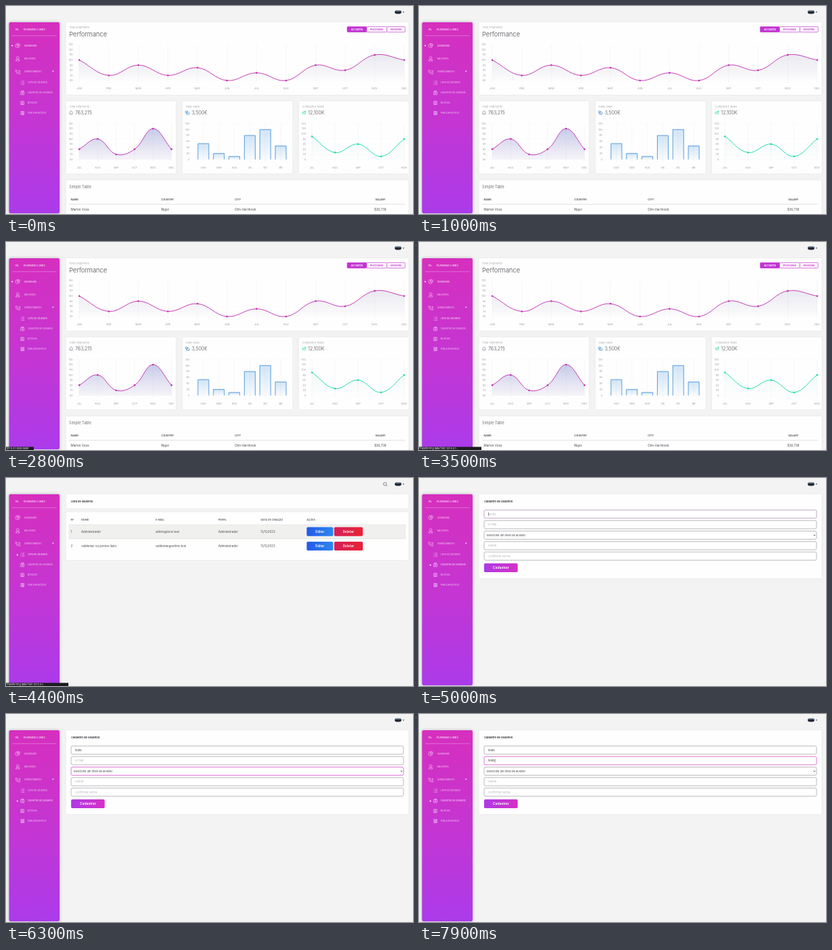
Animation, 600 px wide and 307 px high, one loop 8 s. Source, as an HTML page:

```html
<!DOCTYPE html>
<html lang="pt">
<head>
<meta charset="utf-8">
<style>
html, body { margin: 0; width: 100%; height: 100%; overflow: hidden; background: #f3f3f4 }
svg { display: block; width: 100vw; height: 100vh; font-family: Inter, "Open Sans", sans-serif }
.icon { fill: none; stroke: #fff; stroke-width: .55; opacity: .85 }
.card { fill: #fefefe; filter: drop-shadow(0 .5px 1px #0001) }
</style>
</head>
<body>
<svg id="stage" viewBox="0 0 600 307"></svg>
<script>
const LOOP = 8000, LIST_AT = 3600, FORM_AT = 4500;
const PINK = '#c332b4', INK = '#4a4a52', GREY = '#9a9aa2';
const MONTHS = ['JAN', 'FEB', 'MAR', 'APR', 'MAY', 'JUN', 'JUL', 'AUG', 'SEP', 'OCT', 'NOV', 'DEC'];

const rect = (x, y, x2, y2, attrs) =>
  `<rect x="${x}" y="${y}" width="${x2 - x}" height="${y2 - y}" ${attrs}/>`;
const text = (x, y, s, size = 4, fill = INK, attrs = '') =>
  `<text x="${x}" y="${y}" font-size="${size}" fill="${fill}" ${attrs}>${s}</text>`;
const mid = (x, y, s, size, fill, attrs = '') => text(x, y, s, size, fill, 'text-anchor="middle" ' + attrs);
const path = (d, attrs) => `<path d="${d}" ${attrs}/>`;
const group = (id, body, attrs = '') => `<g id="${id}" ${attrs}>${body}</g>`;
const card = (x, y, x2, y2) => rect(x, y, x2, y2, 'rx="1" class="card"');
const BOLD = 'font-weight="600"', LIGHT = 'font-weight="300"';

function gradient(id, stops, horizontal) {
  const list = stops.map(([color, alpha = 1], i) =>
    `<stop offset="${i / (stops.length - 1)}" stop-color="${color}" stop-opacity="${alpha}"/>`).join('');
  return `<linearGradient id="${id}" x2="${horizontal ? 1 : 0}" y2="${horizontal ? 0 : 1}">${list}</linearGradient>`;
}

// Smooth line through points, each handle parallel to the chord of its neighbours.
function spline(pts, tension = .4) {
  const handles = pts.map(([x, y], i) => {
    const a = pts[i - 1] || pts[i], b = pts[i + 1] || pts[i];
    const da = Math.hypot(x - a[0], y - a[1]), db = Math.hypot(b[0] - x, b[1] - y);
    const ka = tension * da / (da + db), kb = tension * db / (da + db);
    const dx = b[0] - a[0], dy = b[1] - a[1];
    return { before: [x - ka * dx, y - ka * dy], after: [x + kb * dx, y + kb * dy] };
  });
  return 'M' + pts[0] + pts.slice(1).map((p, i) =>
    `C${handles[i].after} ${handles[i + 1].before} ${p}`).join('');
}

// Value labels and faint grid; returns the value-to-height function too.
function axes({ x, y, low, high, step, labels, xs, right }) {
  const [top, bottom] = y, at = v => bottom - (v - low) / (high - low) * (bottom - top);
  let out = '';
  for (let v = low; v <= high; v += step) {
    out += text(x, at(v) + 1.3, v, 3.7, GREY, 'text-anchor="end"');
    out += path(`M${x + 3} ${at(v)}H${right}`, 'stroke="#0000000a" stroke-width=".4"');
  }
  labels.forEach((s, i) => {
    out += path(`M${xs[i]} ${top}V${bottom + 3}`, 'stroke="#00000010" stroke-width=".5"');
    out += mid(xs[i], bottom + 13, s, 3.8, GREY);
  });
  return { at, out };
}

function lineChart(spec, values, color, fill) {
  const xs = values.map((_, i) => spec.first + spec.gap * i), right = xs[xs.length - 1];
  const { at, out } = axes({ ...spec, xs, right });
  const pts = values.map((v, i) => [xs[i], at(v)]), curve = spline(pts);
  return out + path(`${curve}V${spec.y[1]}H${xs[0]}Z`, `fill="url(#${fill})"`) +
    path(curve, `fill="none" stroke="${color}" stroke-width=".95"`) +
    pts.map(([x, y]) => `<circle cx="${x}" cy="${y}" r="1.3" fill="${color}"/>`).join('');
}

function barChart(spec, values) {
  const xs = values.map((_, i) => spec.first + spec.gap * i);
  const { at, out } = axes({ ...spec, xs, right: 417 });
  return out + values.map((v, i) =>
    path(`M${xs[i] - 8} ${at(0)}V${at(v)}h16V${at(0)}`, 'fill="url(#blueFade)" stroke="#4a94d6" stroke-width=".9"')).join('');
}

function sidebar() {
  const item = (x, y, s, id) => text(x, y + 1, s, 2.95, '#fff', `id="${id}" opacity=".8"`);
  const icons = [
    'M16.6 55.6a3 3 0 1 0 3.2 3.6h-3.2zM17.8 55.2v2.8h2.8a2.9 2.9 0 0 0-2.8-2.8',
    'M17.2 74.6a1.7 1.9 0 1 0 .1 0M14.4 81q0-2.6 2.8-2.6t2.8 2.6z',
    'M14 95q.8-1.6 2 0t0 2q1.4 1.6 2.6 1t2 1-1.3 1.3q-5-.5-5.3-5.3M18 95.5h2.5v2',
    'M21.5 111h1m1 0h3.7M21.5 113.3h1m1 0h3.7M21.5 115.6h1m1 0h3.7',
    'M21.7 126.5h5v4.3h-5zM23 126.5v-1.2h2.5v1.2M24.2 127.4v2.6M23 128.7h2.5',
    'M21.8 140.7h4.6v4.8h-4.6zM22.8 142h2.5M22.8 143.2h2.5M22.8 144.4h2.5',
    'M22 155.5h4.6v5H22zM23 157h2.5v1.4H23zM23 159.4h2.5'
  ];
  return rect(4.5, 24, 79, 306, 'rx="2" fill="url(#side)" style="filter:drop-shadow(0 0 2px #0004)"') +
    text(14, 35.6, 'RL', 4.1, '#fff') + text(26, 35.6, 'RUNNING LINES', 4.1, '#fff') +
    path('M9 43.8H74.5', 'stroke="#fff" stroke-opacity=".5" stroke-width=".6"') +
    icons.map(d => path(d, 'class="icon"')).join('') +
    item(27, 58.5, 'DASHBOARD', 'navHome') + item(27, 77.7, 'MEU PERFIL', 'navMe') +
    item(27, 96.7, 'GERENCIAMENTO', 'navAdmin') + path('M67.8 95.7h3l-1.5 1.6z', 'fill="#fff"') +
    item(32, 113, 'LISTA DE USUÁRIOS', 'navList') + item(32, 128, 'CADASTRO DE USUÁRIOS', 'navForm') +
    item(32, 142.8, 'NOTÍCIAS', 'navNews') + item(32, 157.7, 'PUBLICAR NOTÍCIA', 'navPost') +
    '<circle id="dot" r="1" fill="#fff"/>';
}

function header() {
  return rect(573, 6.3, 583, 11.5, 'rx="2.4" fill="url(#photo)"') +
    path('M584.7 8.6h2.6l-1.3 1.5z', 'fill="#333"') +
    path('M561 8.9a2.3 2.3 0 1 1-4.6 0a2.3 2.3 0 1 1 4.6 0M560.4 10.6l1.7 1.7',
      'id="search" fill="none" stroke="#444" stroke-width=".6"');
}

function dashboard() {
  const button = (x, x2, s, on) =>
    rect(x, 30.6, x2, 38.4, `fill="${on ? '#c233d3' : '#fefefe'}" stroke="#c93bd0" stroke-width=".7" rx=".8"`) +
    mid((x + x2) / 2, 35.9, s, 3.8, on ? '#fff' : '#c233c8', BOLD);
  const small = (x, title, value) => card(x, 140.5, x + 162, 247.3) +
    text(x + 4.7, 149.5, title, 4, GREY, LIGHT) + text(x + 13.5, 160.3, value, 6.9, INK, LIGHT);
  const y = [173.5, 226.5];
  return card(88.5, 24, 593.5, 131) +
    text(93, 33.2, 'Total Shipments', 4, GREY, LIGHT) + text(93, 45, 'Performance', 9.3, INK, LIGHT) +
    button(531.5, 561.5, 'Purchases') + button(561.5, 588.3, 'Sessions') + button(503, 531.5, 'Accounts', true) +
    lineChart({ x: 98.5, y: [57, 110], low: 60, high: 130, step: 10, labels: MONTHS, first: 108, gap: 43.55 },
      [100, 70, 90, 70, 85, 60, 75, 60, 90, 80, 110, 100], PINK, 'greyFade') +
    small(88.5, 'Total Shipments', '763,215') +
    path('M93.3 159.2q1-.8 1-2.6a1.7 1.7 0 0 1 3.4 0q0 1.8 1 2.6zM95.3 160.4h1.4', 'fill="none" stroke="#777087" stroke-width=".6"') +
    lineChart({ x: 98.5, y, low: 60, high: 130, step: 10, labels: MONTHS.slice(6), first: 108, gap: 27.2 },
      [80, 100, 70, 80, 120, 80], PINK, 'violetFade') +
    small(260.3, 'Daily Sales', '3,500€') +
    path('M264.7 155h2.5v2.5h-2.5zM267.2 156.4h2l1 1.5v1.6h-4.3zM265.8 159.8h.8M268.5 160h.8', 'fill="none" stroke="#4187d0" stroke-width=".7"') +
    barChart({ x: 270.5, y, low: 0, high: 120, step: 20, labels: ['USA', 'GER', 'AUS', 'UK', 'RO', 'BR'], first: 291, gap: 22.8 },
      [53, 20, 10, 80, 100, 45]) +
    small(431.8, 'Completed Tasks', '12,100K') +
    path('M436.3 157l5.7-2.2-1.2 5-2-1.5-1.2 1.4v-2zM438.8 158.2l3.2-3.4', 'fill="none" stroke="#20d8a4" stroke-width=".6"') +
    lineChart({ x: 442, y, low: 0, high: 140, step: 20, labels: MONTHS.slice(6, 11), first: 451, gap: 34 },
      [90, 27, 60, 12, 80], '#1fdca8', 'greenFade') +
    card(88.5, 257.3, 593.5, 320) + text(93, 268.8, 'Simple Table', 5.5, INK, LIGHT) +
    [['NAME', 95.5], ['COUNTRY', 228.7], ['CITY', 337.3]].map(([s, x]) => text(x, 287, s, 3.75, INK, BOLD)).join('') +
    text(559.5, 287, 'SALARY', 3.75, INK, BOLD + ' text-anchor="end"') +
    path('M93 292.6H588.5', 'stroke="#cfcfd4" stroke-width=".6"') +
    [['Marlen Voss', 95.5], ['Niger', 228.7], ['Olm-Varnhoek', 337.3]].map(([s, x]) => text(x, 301.7, s, 4.6)).join('') +
    text(560.5, 301.7, '$36,738', 4.5, INK, 'text-anchor="end"');
}

function userList() {
  const cols = [95.5, 111, 220.5, 313, 375.5];
  const button = (x, x2, y, s, fill) => rect(x, y, x2, y + 13.2, `rx="1.8" fill="url(#${fill})"`) +
    mid((x + x2) / 2, y + 8.3, s, 4.7, '#fff', BOLD);
  const row = (y, cells) => cells.map((s, i) => text(cols[i], y + 1.6, s, 4.4)).join('') +
    button(443.3, 482.3, y - 6.7, 'Editar', 'blue') + button(483.8, 526, y - 6.7, 'Deletar', 'red');
  return card(88.5, 24, 593.5, 45) + text(96, 36.2, 'Lista de usuários', 3.9, '#25252d', BOLD) +
    card(88.5, 50.3, 593.5, 121) +
    ['Nº', 'NOME', 'E-MAIL', 'PERFIL', 'DATA DE CRIAÇÃO', 'AÇÕES']
      .map((s, i) => text([...cols, 443.3][i], 63.2, s, 3.7, INK, 'font-weight="500"')).join('') +
    rect(93, 69, 588.5, 89.8, 'fill="#f0f0ee" stroke="#d6d6d8" stroke-width=".5"') +
    row(79.2, [1, 'Administrador', 'admin@lorvi.test', 'Administrador', '11/11/2023']) +
    row(100.6, [2, 'valdemar rui pontes lázio', 'valdemar@velmo.test', 'Administrador', '11/11/2023']);
}

function userForm() {
  const field = (y, id, s, x = 102, color = '#b3b1b8') =>
    rect(96, y, 586, y + 12.1, `id="${id}Box" rx="2" fill="#fff" stroke-width=".8"`) +
    text(x, y + 7.6, s, 4.1, color, `id="${id}"`);
  return card(88.5, 24, 593.5, 148) + text(96, 36.3, 'Cadastro de usuários', 4.1, '#25252d', BOLD) +
    field(47.2, 'name', 'Nome') + field(62.8, 'mail', 'E-mail') +
    field(78.3, 'level', 'Selecione um nível de acesso', 99.5, '#3c3c44') +
    field(93.8, 'pass', 'Senha') + field(109.2, 'again', 'Confirmar senha') +
    path('M581.7 83.8l1.3 1.3 1.3-1.3', 'fill="none" stroke="#222" stroke-width=".8"') +
    rect(96, 126, 145.5, 139, 'rx="1.8" fill="url(#pinkButton)"') +
    mid(120.8, 134.3, 'Cadastrar', 5, '#fff', BOLD) +
    group('hint', rect(96, 59.4, 586, 69, 'rx="1" fill="#2c3540"') + text(98, 65.8, 'teste', 4.1, '#fff')) +
    rect(0, 0, .5, 5, 'id="caret" fill="#222"');
}

const stage = document.getElementById('stage');
stage.innerHTML = '<defs>' +
  gradient('side', [['#d62fbe'], ['#c535d2'], ['#ab3bea']]) +
  gradient('photo', [['#8a97ab'], ['#20283a'], ['#171a24']]) +
  gradient('greyFade', [['#7878a8', .16], ['#7878a8', .01]]) +
  gradient('violetFade', [['#6a78c8', .38], ['#8a80c0', .08]]) +
  gradient('blueFade', [['#4a9be0', .25], ['#4a9be0', .03]]) +
  gradient('greenFade', [['#42b89a', .07], ['#42b89a', 0]]) +
  gradient('blue', [['#2458e8'], ['#2e88ee']], true) +
  gradient('red', [['#d5205a'], ['#e82335']], true) +
  gradient('pinkButton', [['#ad3ae6'], ['#d630c6']], true) + '</defs>' +
  rect(0, 0, 600, 307, 'fill="#f3f3f4"') + header() + sidebar() +
  group('home', dashboard()) + group('list', userList()) + group('form', userForm()) +
  group('status', rect(0, 302.4, 92, 307, 'id="statusBox" fill="#1b1b22"') +
    text(.3, 306.4, '', 3.7, '#fff', 'id="statusText"'));

const el = id => document.getElementById(id);
const show = (id, on) => el(id).style.display = on ? '' : 'none';
const typed = (t, start) => 'teste'.slice(0, Math.max(0, Math.floor((t - start) / 100)));

function fill(id, value, placeholder) {
  el(id).textContent = value || placeholder;
  el(id).setAttribute('fill', value ? '#333' : '#b3b1b8');
}

function drawForm(t) {
  const focus = t < 4900 ? '' : t < 6200 ? 'name' : t < 6800 ? 'level' : 'mail';
  fill('name', typed(t, 5000), 'Nome');
  fill('mail', typed(t, 7000), 'E-mail');
  for (const id of ['name', 'mail', 'level', 'pass', 'again']) {
    const color = id !== focus ? '#aaa8ae' : id === 'name' ? '#b58fb8' : '#d653cc';
    el(id + 'Box').setAttribute('stroke', color);
  }
  show('hint', t >= 5100 && t < 6200);
  const typing = focus === 'name' || focus === 'mail';
  show('caret', typing);
  if (typing) {
    const done = typed(t, focus === 'name' ? 5000 : 7000);
    const width = done ? el(focus).getComputedTextLength() : 0;
    el('caret').setAttribute('x', 102.2 + width);
    el('caret').setAttribute('y', focus === 'name' ? 50.8 : 66.4);
  }
}

function draw(now) {
  const t = now % LOOP;
  const page = t < LIST_AT ? 'home' : t < FORM_AT ? 'list' : 'form';
  for (const id of ['home', 'list', 'form']) show(id, id === page);
  show('search', page === 'list');

  const [dotX, dotY] = { home: [9.2, 58.5], list: [16.7, 113.6], form: [16.7, 128.5] }[page];
  el('dot').setAttribute('cx', dotX);
  el('dot').setAttribute('cy', dotY);
  el('navHome').setAttribute('opacity', page === 'home' ? 1 : .8);
  el('navList').setAttribute('opacity', t >= 1700 && t < FORM_AT ? 1 : .8);
  el('navForm').setAttribute('opacity', page === 'form' ? 1 : .8);

  const loading = t >= 3200;
  show('status', t >= 1700 && t < FORM_AT);
  el('statusBox').setAttribute('width', loading ? 92 : 41);
  el('statusText').textContent = loading ? 'Transferring data from 127.0.0.1…' : '127.0.0.1:8000/user';

  if (page === 'form') drawForm(t);
  requestAnimationFrame(() => draw(performance.now()));
}
draw(performance.now());
</script>
</body>
</html>
```
